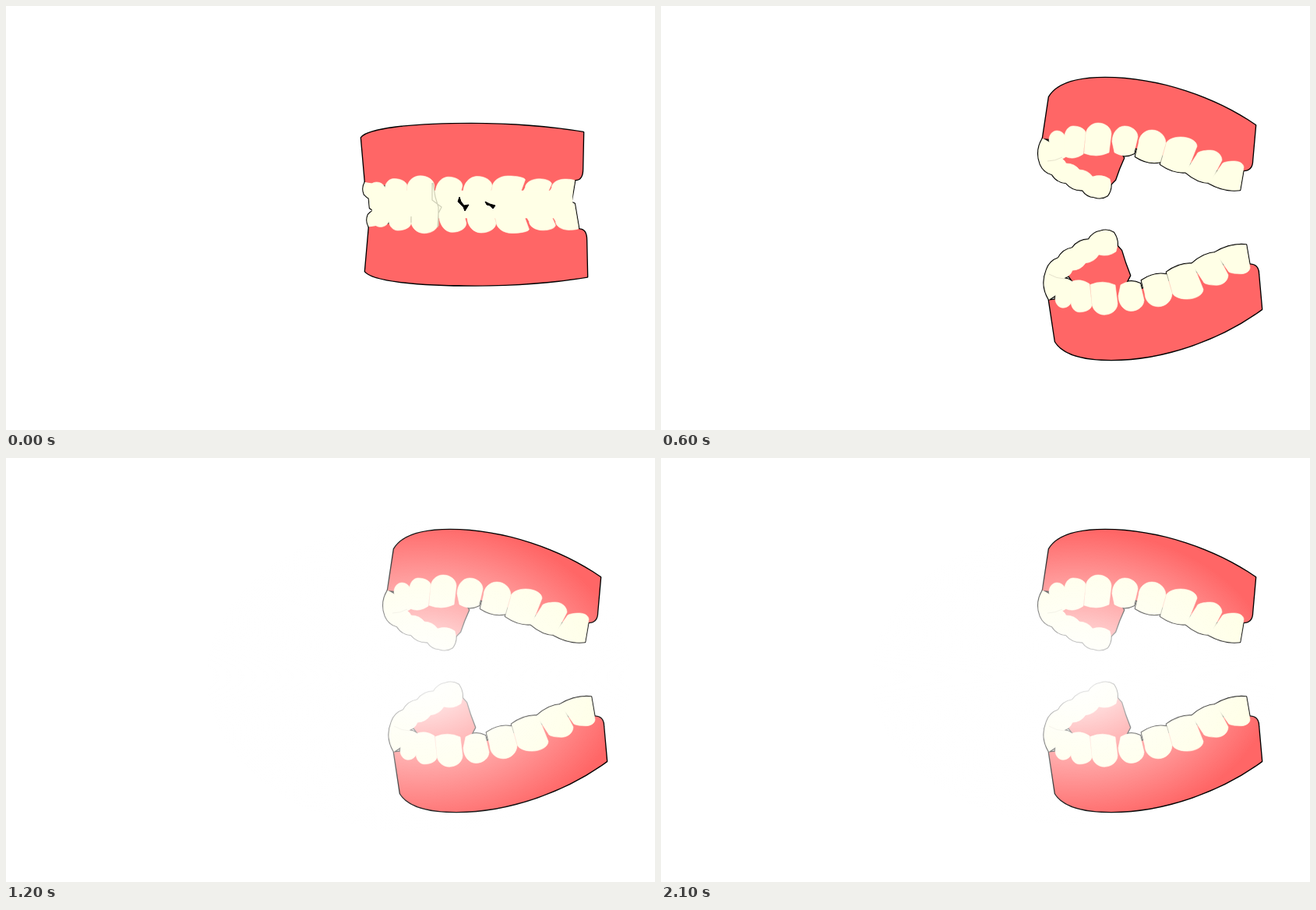
Recreate the animation shown at these times as an HTML page. Size 833 px wide and 544 px high, loop 2300 ms.

```html
<!DOCTYPE html>
<html lang="en">
<head>
<meta charset="utf-8">
<title>Teeth</title>
<style>
html, body { margin: 0; width: 100%; height: 100%; overflow: hidden; background: #fff; }
svg { display: block; width: 100vw; height: 100vh; }
.pose, .glow { animation: 2300ms step-end infinite; }
.pose { visibility: hidden; }
.edge { fill: #000; stroke: #000; stroke-width: 2.7; stroke-linejoin: round; }
.gum { fill: #ff6666; }
.tooth { fill: #ffffe6; stroke: #ffffe6; stroke-width: .6; }
.hole { fill: #000; stroke: #000; stroke-linejoin: round; }
.seam { fill: none; stroke: #d0d0b8; stroke-width: 1.2; }
.faint { fill: none; stroke: #e6e2cc; }
#p0 { animation-name: shut; }
#p1 { animation-name: ajar; }
#p2 { animation-name: half; }
#p3 { animation-name: wide; }
.glow { animation-name: glow; opacity: 0; }
@keyframes shut { 0% { visibility: visible; } 8.695%, 100% { visibility: hidden; } }
@keyframes ajar { 0% { visibility: hidden; } 8.695% { visibility: visible; } 17.391%, 100% { visibility: hidden; } }
@keyframes half { 0% { visibility: hidden; } 17.391% { visibility: visible; } 26.086%, 100% { visibility: hidden; } }
@keyframes wide { 0% { visibility: hidden; } 26.086%, 100% { visibility: visible; } }
@keyframes glow {
  0% { opacity: 0; transform: scale(1, 1); }
  43.478% { opacity: .75; transform: scale(175, 122); }
  52.173% { opacity: 1; transform: scale(272, 200); }
  60.869% { opacity: 0; transform: scale(1, 1); }
  82.608% { opacity: .75; transform: scale(175, 122); }
  91.304%, 100% { opacity: 1; transform: scale(260, 190); }
}
</style>
</head>
<body>
<svg viewBox="0 0 833 544" preserveAspectRatio="none">
  <defs>
    <radialGradient id="light">
      <stop offset="0" stop-color="#fff"/>
      <stop offset="1" stop-color="#fff" stop-opacity="0"/>
    </radialGradient>
  </defs>
  <g id="jaws"></g>
  <g transform="translate(530 281)"><circle class="glow" r="1" fill="url(#light)"/></g>
</svg>
<script>
const points = text => text.split(' ').map(p => p.split(',').map(Number));
const mix = (a, b, t) => Array.isArray(a) ? a.map((v, i) => mix(v, b[i], t)) : a + (b - a) * t;

// Near teeth of the wide-open upper jaw: left, top, right, bite right, bite left.
const teeth = [
  '498,172 508,160 519,170 519,194 500,194',
  '518,168 529,154 545,163 542,190 518,193',
  '545,166 561,150 578,164 575,188 543,189',
  '579,174 595,154 612,168 607,189 582,188',
  '613,176 630,159 648,176 641,200 609,193',
  '648,178 667,168 688,180 675,213 641,203',
  '688,190 705,185 720,198 705,227 673,213',
  '720,203 736,199 748,207 743,236 703,227'
].map(points);
const under = points('720,212 600,180');

// The arch bends as the jaw turns, most at its middle.
const bend = (dx, kx, dy, ky) => ([x, y]) =>
  [x + dx + kx * (x - 548), y + dy - ky * (x - 548) ** 2];

const flip = (dx, c, k, s) => ([x, y]) => [x + dx, c + k * (x - 570) - s * y];

// Squeezes the far side behind the near teeth of the closed jaw.
const tuck = ([x, y]) => [x - 20, 226 + (y - 183) * .54];

function upperJaw(gum, palate, far, warp) {
  return {
    gum: [...points(gum), ...under.map(warp)],
    palate, far,
    near: teeth.map(t => t.map(warp))
  };
}

function pose(upper, front, back = front) {
  const lower = {
    gum: upper.gum.map(front),
    palate: upper.palate.map(back),
    far: upper.far.map(back),
    near: upper.near.map(t => t.map(front))
  };
  return { upper, lower, marks: [] };
}

const halfPalate = points('520,212 530,185 570,190 583,212 581,219 577,225 571,232 555,232');
const halfFar = points('481,183 480,212 497,225 519,237 537,242 553,248 568,247 572,227 551,224 536,216 529,214 512,210');
const widePalate = points('512,200 535,172 580,172 594,195 588,209 583,223 576,230 560,235');
const wideFar = points('490,170 487,203 502,216 520,227 541,236 556,245 573,243 576,222 554,219 537,210 520,202 510,194');

const shut = pose(
  upperJaw('456,169 597,151 741,162 740,209 731,223 461,226',
    halfPalate.map(tuck), halfFar.map(tuck), bend(-30, .06, 68, .00127)),
  flip(5, 509.5, 0, 1));
const half = pose(
  upperJaw('486,128 565,107 758,155 755,200 745,212 481,183',
    halfPalate, halfFar, bend(-10, .04, 18, .00036)),
  flip(1.5, 512, .015, .97));
const wide = pose(
  upperJaw('498,117 570,92 763,153 759,198 747,211 490,170',
    widePalate, wideFar, p => p),
  flip(8, 546, -.02, 1), flip(8, 570.5, -.02, 1.15));

const mixJaw = (a, b, t) =>
  Object.fromEntries(Object.keys(a).map(k => [k, mix(a[k], b[k], t)]));
const ajar = {
  upper: mixJaw(shut.upper, half.upper, .42),
  lower: mixJaw(shut.lower, half.lower, .42),
  marks: []
};

shut.marks = [
  ['tooth', 'M470 237H727V272H470Z'],
  ['seam', 'M547 227V249L559 258L555 266L554 284M548 227L551 245L555 258V282M520 270V278'],
  ['hole', 'M582 245L584 251L588 256L594 255L589 263L587 258L580 251ZM615 251L621 254L628 256L625 260L621 256L617 255Z']
];
half.marks = [
  ['faint', 'M483 213Q500 218 507 208Q512 214 530 212M486 301Q500 301 510 306Q516 302 533 304']
];
wide.marks = [
  ['faint', 'M496 199Q506 199 515 194M498 344Q508 350 518 350']
];

const at = (...nums) => nums.map(n => n.toFixed(1)).join(' ');
const polygon = list => 'M' + list.map(p => at(...p)).join('L') + 'Z';

function gumPath([a, b, c, d, e, g, u, v]) {
  const w = c[0] - b[0], h = c[1] - b[1];
  return `M${at(...a)}C${at(a[0] + 9, b[1] + (a[1] - b[1]) * .36,
    a[0] + (b[0] - a[0]) * .45, b[1], ...b)}` +
    `C${at(b[0] + w * .36, b[1], b[0] + w * .74, b[1] + h * .43, ...c)}` +
    `L${at(...d)}Q${at(d[0], e[1], ...e)}L${at(...u)}L${at(...v)}L${at(...g)}Z`;
}

// A closed row of outward bumps between neighbouring points.
function bumps(list, side) {
  const k = .25 * side;
  return list.reduce((d, [x, y], i) => {
    const [nx, ny] = list[(i + 1) % list.length];
    return d + 'Q' + at((x + nx) / 2 - (ny - y) * k, (y + ny) / 2 + (nx - x) * k, nx, ny);
  }, 'M' + at(...list[0])) + 'Z';
}

function toothPath([l, p, r, br, bl], side) {
  const r55 = (a, b) => a + (b - a) * .55;
  return `M${at(...l)}C${at(l[0], r55(l[1], p[1]), r55(p[0], l[0]), p[1], ...p)}` +
    `C${at(r55(p[0], r[0]), p[1], r[0], r55(r[1], p[1]), ...r)}L${at(...br)}` +
    `Q${at((br[0] + bl[0]) / 2, (br[1] + bl[1]) / 2 + 7 * side, ...bl)}Z`;
}

const layers = (jaw, side) => [
  ['gum', polygon(jaw.palate)],
  ['tooth', bumps(jaw.far, side)],
  ['gum', gumPath(jaw.gum)],
  ...jaw.near.map(t => ['tooth', toothPath(t, side)])
];

const path = ([kind, d]) => `<path class="${kind}" d="${d}"/>`;

function draw({ upper, lower, marks }, i) {
  const shapes = [...layers(lower, -1), ...layers(upper, 1)];
  const edges = shapes.map(([, d]) => path(['edge', d]));
  return `<g class="pose" id="p${i}">${[...edges, ...[...shapes, ...marks].map(path)].join('')}</g>`;
}

document.getElementById('jaws').innerHTML = [shut, ajar, half, wide].map(draw).join('');
</script>
</body>
</html>
```
